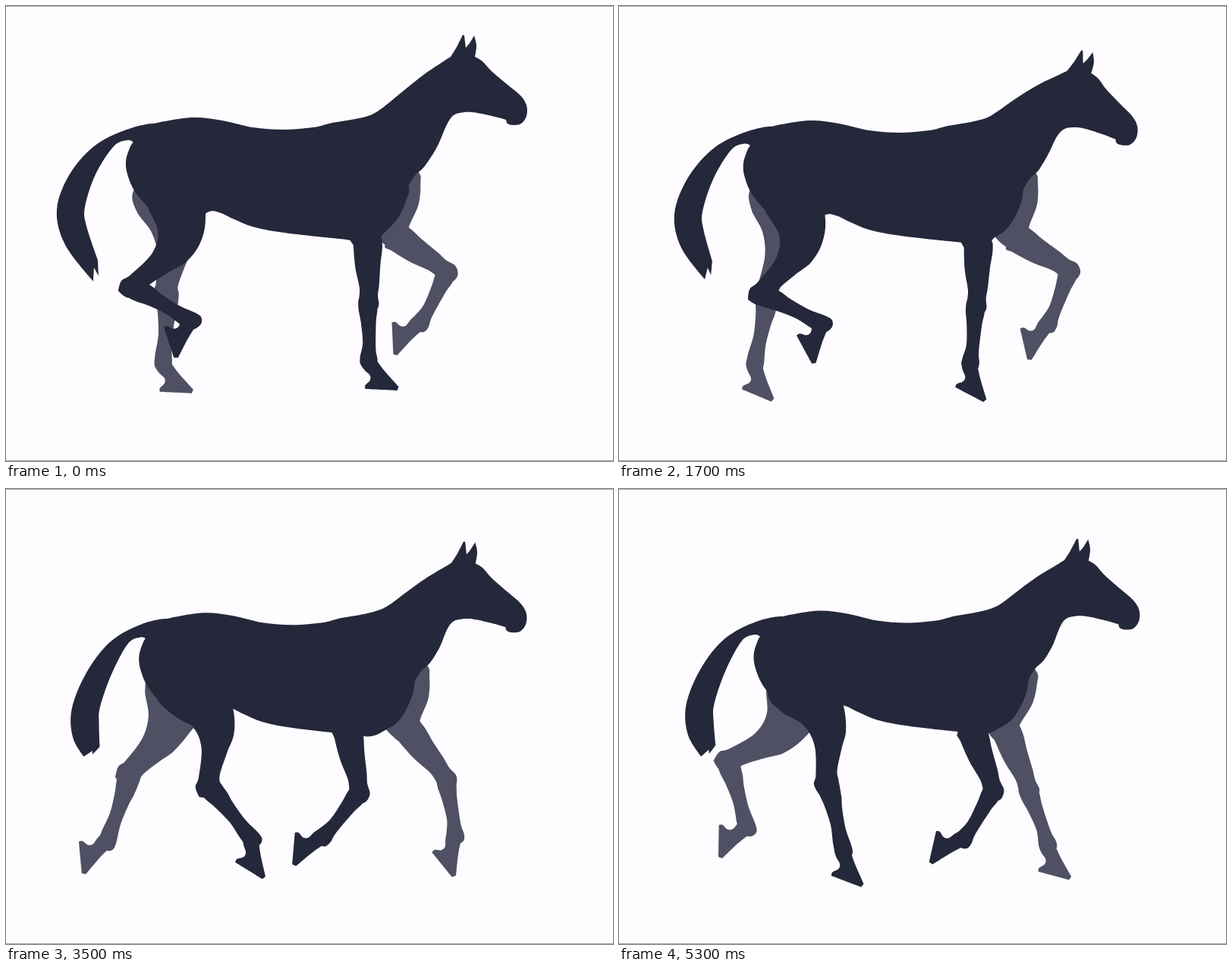
Recreate the animation shown at these times as an HTML page with a canvas. Size 800 by 600 pixels, loop 5400 ms.

```html
<!DOCTYPE html>
<html lang="en">
<head>
<meta charset="utf-8">
<title>Trotting horse</title>
<style>
  html, body { margin: 0; width: 100%; height: 100%; overflow: hidden; background: #fefcff; }
  canvas { display: block; }
</style>
</head>
<body>
<canvas id="stage" width="800" height="600"></canvas>
<script>
const ctx = document.getElementById('stage').getContext('2d');
const PAPER = '#fefcff', NEAR = '#25273a', FAR = '#4f5063', RULE = '#a4a3a7';
const STEP = 100, STEPS = 54, STRIDE = 16, HALF = STRIDE / 2;

// "x,y" pairs; a trailing ! marks a sharp corner
const points = text => text.trim().split(/\s+/).map(p => {
  const [x, y] = p.split(',').map(parseFloat);
  return { x, y, sharp: p.endsWith('!') };
});

// A smooth cyclic curve through a few "phase:value" keys
function cycle(text) {
  const keys = text.split(' ').map(k => k.split(':').map(Number)), n = keys.length;
  const key = i => {
    const lap = Math.floor(i / n), [t, v] = keys[i - lap * n];
    return { t: t + lap * STRIDE, v };
  };
  const slope = i => (key(i + 1).v - key(i - 1).v) / (key(i + 1).t - key(i - 1).t);
  return phase => {
    const p = (phase % STRIDE + STRIDE) % STRIDE;
    let i = 0;
    while (key(i + 1).t <= p) i++;
    const a = key(i), b = key(i + 1), d = b.t - a.t, u = (p - a.t) / d;
    return a.v + (b.v - a.v) * u * u * (3 - 2 * u)
      + d * u * (1 - u) * (slope(i) * (1 - u) - slope(i + 1) * u);
  };
}

// Outlines of the body, in the rest pose
const torso = points(`541,221! 531,236 528,252 521,270 508,290 490,302 470,310 440,307
  410,304 360,298 325,291 298,280 283,273 268,271 248,285 232,294 212,287 190,268
  170,245 160,222 158,205 162,190 169,178 190,158 215,151 250,147 285,151 325,160
  365,163 405,160 430,154 455,150 480,144`);
const crest = points('498,133 520,115 550,91 578,72');
const head = points(`586,67! 594,54 602,38! 604,39! 606,55! 611,49 617,39! 620,52 618,67!
  628,73 640,86 660,103 678,118 686,131 686,145 679,155 668,157 661,155 659,150!
  640,145 614,140 598,141`);
const throat = points('590,144 584,151 578,163 568,186 552,211');
const tail = points(`200,156 165,161 120,182 85,220 67,268 78,315 115,363! 116,345! 122,356!
  121,335! 106,290 104,265 118,222 142,185 160,177 168,180!`);

// Limb parts, hanging straight down from their own joint
const arm = points('30,20 53,47 51,64 40,89 19,113 15,128 -5,130 -20,123 -30,90 -20,40');
const forearm = points(`-17,-8 -18,4 -16,33 -11,60 -12,78 -9,90 0,94 8,92 14,83 13,70
  15,55 17,30 20,4 15,-8`);
const foreCannon = points(`-10,-8 -13,5 -10,25 -8,52 -12,72 -10,82 0,86 9,83 11,74 9,60
  10,25 12,8 10,-8`);
const thigh = points(`-10,-40 -46,0 -42,28 -22,55 -13,85 -15,122 -19,134 -15,148! 0,152
  14,142 14,126 23,100 31,80 36,52 40,20 30,-20`);
const hindCannon = points(`-12,-4 -14,10 -11,28 -9,55 -12,82 -11,96 0,103 9,100 11,90 9,65
  11,38 14,20 14,-6 0,-10`);
const hoof = points(`-6,-8 -12,2 -7,12 1,20 1,27 -5,33 -5,38! 37,40! 39,35! 21,15 11,2 5,-7`);

const HIP = { x: 215, y: 243 }, SHOULDER = { x: 478, y: 190 };

// Joint angles over one stride, in degrees, positive swings backwards
const hind = {
  thigh: cycle('0:21 1:14 3:-15 5:-17.5 8:1 11:30 13:41'),
  cannon: cycle('0:-61 2:-60 3:-40 5:-14 8:3 11:18 13:-17'),
  hoof: cycle('0:69 2:46 3:29 5:18 8:0 9:20 11:82 13:88')
};
const fore = {
  arm: cycle('0:1 1:4 2:16 3:18 5:11 7.5:-18 11:-20 12.5:-10.5'),
  forearm: cycle('0:-1 1.5:1 3:-11 5:-20 7.5:-55 9:-56 11:-32 12.5:-21'),
  cannon: cycle('0:-1 1:5 2.5:37 5:31 8:25 10:2 11:-20 12.5:-20'),
  hoof: cycle('0:0 1:25 3:92 5:100 8:74 10:48 11.3:17 14:9')
};
const sway = cycle('0:0 1:5 3:15 5:17 11:15 13:12 15:2');
const nodDrop = cycle('0:16 3:31 4:31 8:16 11:20 13:22');
const tailLift = cycle('0:0 5:0 8:.5 10:1 11:1.2 13:.7 15:.1');
const tailDroop = cycle('0:0 1:.25 3:1 5:.85 8:.4 10:0');
const bob = k => Math.cos(2 * Math.PI * k / HALF);

const turn = (p, deg, at = { x: 0, y: 0 }) => {
  const a = deg * Math.PI / 180, c = Math.cos(a), s = Math.sin(a);
  return { x: at.x + p.x * c - p.y * s, y: at.y + p.x * s + p.y * c, sharp: p.sharp };
};
const shift = (p, x, y) => ({ x: p.x + x, y: p.y + y, sharp: p.sharp });
const clamp = v => Math.min(1, Math.max(0, v));

// Fills a closed smooth curve through the points
function blob(pts, color) {
  const n = pts.length, at = i => pts[(i + n) % n];
  const slope = i => at(i).sharp ? { x: 0, y: 0 } : {
    x: (at(i + 1).x - at(i - 1).x) / 6,
    y: (at(i + 1).y - at(i - 1).y) / 6
  };
  ctx.fillStyle = color;
  ctx.beginPath();
  ctx.moveTo(pts[0].x, pts[0].y);
  for (let i = 0; i < n; i++) {
    const a = at(i), b = at(i + 1), u = slope(i), v = slope(i + 1);
    ctx.bezierCurveTo(a.x + u.x, a.y + u.y, b.x - v.x, b.y - v.y, b.x, b.y);
  }
  ctx.fill();
}

// Draws a limb part and returns the joint at its lower end
function part(shape, joint, deg, length, color) {
  blob(shape.map(p => turn(p, deg, joint)), color);
  return turn({ x: 0, y: length }, deg, joint);
}

function hindLeg(k, hip, color) {
  const a = hind.thigh(k), b = hind.cannon(k);
  const bulge = .33 * (a - b) + .9 * Math.max(0, -a);
  // The stifle pushes forward as the leg folds
  const flexed = thigh.map(p =>
    shift(p, bulge * clamp(p.y < 50 ? (p.y + 50) / 100 : (142 - p.y) / 70), 0));
  const hock = part(flexed, hip, a, 137, color);
  const fetlock = part(hindCannon, hock, b, 91, color);
  part(hoof, fetlock, hind.hoof(k), 0, color);
}

function foreLeg(k, shoulder, lag, color) {
  const p = k - lag;
  const elbow = part(arm, shoulder, fore.arm(p), 122, color);
  const knee = part(forearm, elbow, fore.forearm(p), 80, color);
  const fetlock = part(foreCannon, knee, fore.cannon(p), 75, color);
  part(hoof, fetlock, fore.hoof(p - lag), 0, color);
}

// Lifting shortens and curls the tail, drooping tucks its end under
function swish(p, lift, droop) {
  const free = clamp((200 - p.x) / 35), t = (p.y - 160) / 200;
  const curl = 17 * Math.sin(Math.PI * clamp((p.y - 180) / 180)) - 9;
  const tuck = 24 * t - 50 * t ** 3;
  return shift(p, free * (lift * curl + droop * tuck),
    free * (droop * tuck - lift * 26 * t));
}

function draw(n) {
  const k = n % STRIDE, far = k + HALF;
  const dy = 8.7 + 9 * bob(k - 3.7);
  // The rump sways more than the chest
  const dx = x => sway(k) * (1.4 - x / 640);
  const ride = p => shift(p, dx(p.x), dy);
  const hip = ride(HIP), shoulder = ride(SHOULDER);

  // Nodding starts after the first step
  const awake = Math.min(1, n);
  const drop = awake * nodDrop(k), nod = awake * 3.5 * (1 + bob(k));
  const pull = (p, w) => {
    const a = ride(p), b = turn(shift(p, -600, -110), nod, { x: 600, y: 110 + drop });
    return shift(p, a.x + w * (b.x - a.x) - p.x, a.y + w * (b.y - a.y) - p.y);
  };

  ctx.fillStyle = PAPER;
  ctx.fillRect(0, 0, 800, 600);

  hindLeg(far, hip, FAR);
  foreLeg(far, shoulder, .5, FAR);

  blob(tail.map(p => shift(swish(p, tailLift(k), tailDroop(k)), sway(k), dy)), NEAR);
  blob([
    ...torso.map(ride),
    ...crest.map((p, i) => pull(p, Math.min(1, .3 + .27 * i))),
    ...head.map(p => pull(p, 1)),
    ...throat.map((p, i) => pull(p, 1 - i * i / 18))
  ], NEAR);

  hindLeg(k, hip, NEAR);
  foreLeg(k, shoulder, 0, NEAR);

  ctx.fillStyle = RULE;
  ctx.fillRect(0, 0, 800, 1);
  ctx.fillRect(0, 599, 800, 1);
}

const start = performance.now();
function tick() {
  draw(Math.floor((performance.now() - start) / STEP) % STEPS);
  requestAnimationFrame(tick);
}
tick();
</script>
</body>
</html>
```
